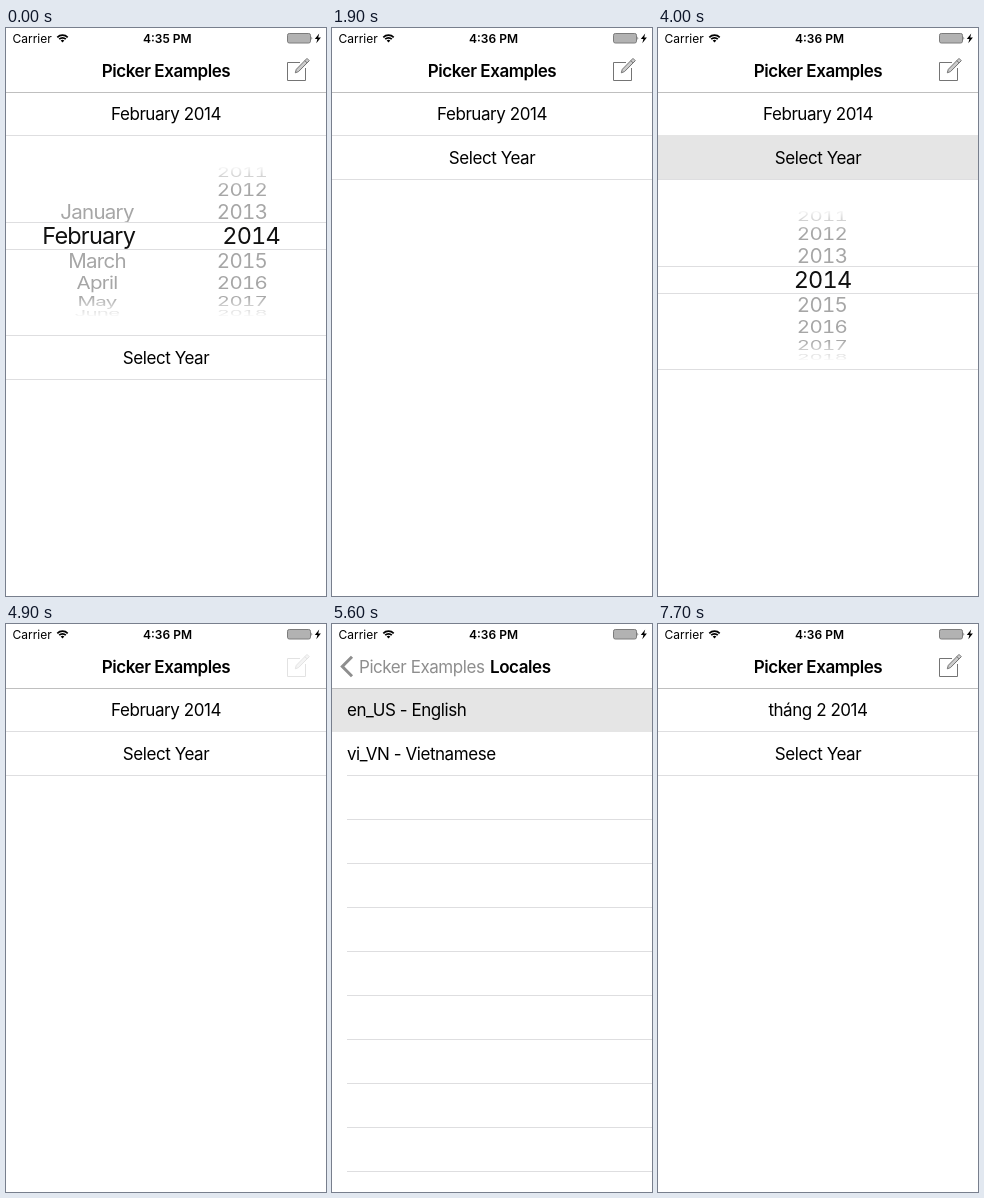
Write an HTML page that moves like this. It is 320 px wide and 568 px high and loops after 8 s.

```html
<!DOCTYPE html>
<html lang="en">
<head>
<meta charset="utf-8">
<title>Picker Examples</title>
<style>
html, body { margin: 0; width: 100%; height: 100%; overflow: hidden; background: #fff; }

/* Stepped state: one animation per part, everything else is derived with calc(). */
#stage {
  --push: 0; --press: 1; --minute: 0; --swap: 0; --choice: 0;
  --open1: 1; --tap1: 0; --open2: 0; --tap2: 0;
  position: relative; width: 320px; height: 568px; overflow: hidden;
  background: #fff; color: #000; white-space: nowrap;
  font: 17px/44px Inter, "Noto Sans", sans-serif; letter-spacing: -.026em;
  animation: 8s step-end infinite;
  animation-name: date-row, year-row, clock, press, push, locale;
}
@keyframes date-row {
  0% { --open1: 1; --tap1: 0 }
  6.25% { --open1: .95; --tap1: 1 }
  7.5% { --open1: .52; --tap1: .6 }
  8.75% { --open1: .08; --tap1: .2 }
  10% { --open1: 0; --tap1: 0 }
  100% { --open1: 0; --tap1: 0 }
}
@keyframes year-row {
  0% { --open2: 0; --tap2: 0 }
  30% { --open2: 0; --tap2: 1 }
  31.25% { --open2: .15; --tap2: .85 }
  32.5% { --open2: .62; --tap2: .45 }
  33.75% { --open2: .95; --tap2: .1 }
  35% { --open2: 1; --tap2: 0 }
  50% { --open2: .95; --tap2: 1 }
  51.25% { --open2: .52; --tap2: .6 }
  52.5% { --open2: .08; --tap2: .2 }
  53.75% { --open2: 0; --tap2: 0 }
  100% { --open2: 0; --tap2: 0 }
}
@keyframes clock { 0% { --minute: 0 } 23.75%, 100% { --minute: 1 } }
@keyframes press { 0% { --press: 1 } 61.25% { --press: .2 } 70%, 100% { --press: 1 } }
@keyframes push {
  0% { --push: 0 }
  63.75% { --push: .234 }
  65% { --push: .836 }
  66.25% { --push: .97 }
  67.5% { --push: .993 }
  68.75% { --push: .998 }
  70% { --push: 1 }
  90% { --push: .766 }
  91.25% { --push: .164 }
  92.5% { --push: .03 }
  93.75% { --push: .007 }
  95% { --push: .002 }
  96.25%, 100% { --push: 0 }
}
@keyframes locale {
  0% { --swap: 0; --choice: 0 }
  80% { --swap: 1; --choice: 0 }
  90%, 100% { --swap: 1; --choice: 1 }
}

.page { position: absolute; top: 64px; width: 320px; height: 504px; background: #fff; }
#home { transform: translateX(calc(var(--push) * -96px)); }
#locales {
  transform: translateX(calc((1 - var(--push)) * 320px));
  background: #fff repeating-linear-gradient(transparent 0 43px, #dedee0 43px 44px) 15px 0 no-repeat;
}
#locales::before {
  content: ""; position: absolute; left: -8px; width: 8px; height: 100%;
  background: linear-gradient(to right, transparent, rgba(0, 0, 0, .22));
  opacity: calc(var(--push) * 4);
}

.row { position: relative; height: 44px; text-align: center; }
.row::before { content: ""; position: absolute; inset: -1px 0 0; background: #e5e5e5; opacity: var(--lit); }
.row span { position: absolute; inset: 0; }
#home .row::after, .drawer::after, .band {
  content: ""; position: absolute; left: 0; bottom: 0; width: 100%; height: 1px; background: #dedee0;
}
#locales .row { text-align: left; }
#locales .row span { left: 15px; }

.drawer { position: relative; height: calc(var(--open) * 200px); overflow: hidden; }
.band { bottom: auto; }
.wheel {
  position: absolute; top: 0; width: 320px; height: 200px;
  -webkit-mask-image: linear-gradient(transparent 29px, #000 52px, #000 160px, transparent 182px);
  mask-image: linear-gradient(transparent 29px, #000 52px, #000 160px, transparent 182px);
}
.wheel div {
  position: absolute; top: 100.6px; color: #a6a6a6;
  font-size: 20.5px; line-height: 28px; letter-spacing: -.035em; font-variant-numeric: tabular-nums;
}
.wheel .picked { top: 100.2px; font-size: 23.5px; color: #111; }

#bar { position: absolute; top: 0; width: 320px; height: 64px; background: #fff; border-bottom: 1px solid #bfbfbf; }
#bar svg { position: absolute; left: 0; top: 0; }
#bar span { position: absolute; top: 20.5px; }
#bar b { font-weight: 600; }
#bar .status { top: 0; font-size: 12px; line-height: 21px; letter-spacing: 0; }
#title { left: 0; width: 320px; text-align: center; opacity: calc(1 - 1.5 * var(--push)); transform: translateX(calc(var(--push) * -51px)); }
#back, #sub { --away: calc(1 - var(--push)); }
#back { left: 27px; color: #8e8e8e; opacity: calc(1 - 1.7 * var(--away)); transform: translateX(calc(var(--away) * 51px)); }
#sub { left: 158px; opacity: calc(1 - 1.45 * var(--away)); transform: translateX(calc(var(--away) * 120px)); }
#chevron { opacity: calc(1 - 1.7 * (1 - var(--push))); }
#compose { opacity: calc((1 - 1.5 * var(--push)) * var(--press)); }
</style>
</head>
<body>
<div id="stage">
  <div class="page" id="home">
    <div class="row" style="--lit: var(--tap1)">
      <span style="opacity: calc(1 - var(--swap))">February 2014</span>
      <span style="opacity: var(--swap)">tháng 2 2014</span>
    </div>
    <div class="drawer" id="date" style="--open: var(--open1)"></div>
    <div class="row" style="--lit: var(--tap2)"><span>Select Year</span></div>
    <div class="drawer" id="year" style="--open: var(--open2)"></div>
  </div>

  <div class="page" id="locales">
    <div class="row" style="--lit: calc(1 - var(--choice))"><span>en_US - English</span></div>
    <div class="row" style="--lit: var(--choice)"><span>vi_VN - Vietnamese</span></div>
  </div>

  <div id="bar">
    <span class="status" style="left: 6.5px">Carrier</span>
    <span class="status" style="left: 137px; opacity: calc(1 - var(--minute))"><b>4:35 PM</b></span>
    <span class="status" style="left: 137px; opacity: var(--minute)"><b>4:36 PM</b></span>
    <span id="title"><b>Picker Examples</b></span>
    <span id="back">Picker Examples</span>
    <span id="sub"><b>Locales</b></span>
    <svg width="320" height="64" fill="none">
      <g stroke="#000" stroke-width="1.7">
        <path d="M51.3 9.3A7.3 7.3 0 0 1 61.7 9.3M53.2 11.2A4.6 4.6 0 0 1 59.8 11.2"/>
        <path d="M56.5 14.6l-1.8-2a2.5 2.5 0 0 1 3.6 0z" fill="#000" stroke="none"/>
      </g>
      <rect x="281.5" y="5.5" width="23" height="9.5" rx="1.8" fill="#b2b2b2" stroke="#7c7c7c"/>
      <path d="M305.5 8.5q1.6 1.7 0 3.5z" fill="#555"/>
      <path d="M313.2 5.5L308.8 11h2.6l-1.1 4.2 4.6-5.7h-2.7z" fill="#000"/>
      <path id="chevron" d="M20 32.7L10.3 42.5 20 52.3" stroke="#8e8e8e" stroke-width="3"/>
      <g id="compose" stroke="#747474">
        <path d="M294 34.5H281.5V52.5H299.5V40"/>
        <path d="M301 30.4l2.3 2.3-10.8 10.9-3.2 1.2 1-3.5zM298.8 32.6l2.4 2.4" fill="#ccc"/>
      </g>
    </svg>
  </div>
</div>

<script>
const RADIUS = 82.5, STEP = .3, MID = 160, ZOOM = 1.12;

function addColumn(wheel, items, picked, x) {
  items.forEach((label, i) => {
    const angle = (i - picked) * STEP;
    const item = document.createElement("div");
    item.textContent = label;
    if (i === picked) item.className = "picked";
    item.style.left = (i === picked ? MID + (x - MID) * ZOOM : x) + "px";
    item.style.transform =
      `translate(-50%, -50%) translateY(${RADIUS * Math.sin(angle)}px) scaleY(${Math.cos(angle)})`;
    wheel.append(item);
  });
}

function addPicker(id, columns) {
  const drawer = document.getElementById(id);
  const wheel = document.createElement("div");
  wheel.className = "wheel";
  columns.forEach(column => addColumn(wheel, ...column));
  drawer.append(wheel);
  for (const y of [86, 113]) {
    const band = document.createElement("div");
    band.className = "band";
    band.style.top = y + "px";
    drawer.append(band);
  }
}

const years = Array.from({ length: 8 }, (_, i) => 2011 + i);
const months = ["January", "February", "March", "April", "May", "June"];
addPicker("date", [[months, 1, 91], [years, 3, 236]]);
addPicker("year", [[years, 3, 164]]);
</script>
</body>
</html>
```
